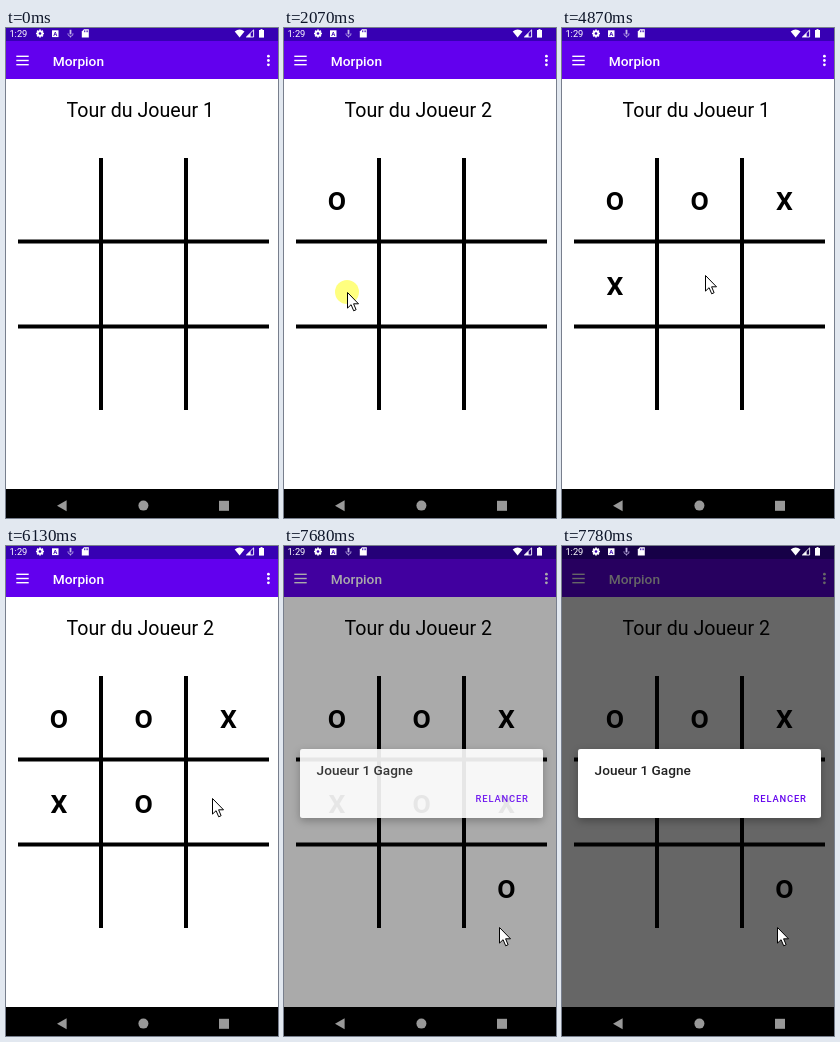
Recreate the animation shown at these times as an HTML page with a canvas. Size 272 by 490 pixels, loop 8000 ms.

```html
<!DOCTYPE html>
<html lang="fr">
<head>
<meta charset="utf-8">
<title>Morpion</title>
<style>
html, body { margin: 0; width: 100%; height: 100%; overflow: hidden; background: #fff; }
canvas { display: block; width: 272px; height: 490px; }
</style>
</head>
<body>
<canvas id="stage"></canvas>
<script>
const W = 272, H = 490, LOOP = 8000;
const canvas = document.getElementById('stage');
const ctx = canvas.getContext('2d');
const ratio = window.devicePixelRatio || 1;
canvas.width = W * ratio;
canvas.height = H * ratio;

const COLS = [53, 137.7, 222.5];
const ROWS = [181.6, 266.6, 351.6];

// Each turn: press, release and mark times, cell, pointer position
const turns = [
  { press: 1110, release: 1360, mark: 1410, col: 0, row: 0, at: [46, 166] },
  { press: 2070, release: 2270, mark: 2320, col: 0, row: 1, at: [63, 264] },
  { press: 2980, release: 3250, mark: 3250, col: 1, row: 0, at: [157, 162] },
  { press: 4160, release: 4360, mark: 4410, col: 2, row: 0, at: [215, 179] },
  { press: 5170, release: 5370, mark: 5420, col: 1, row: 1, at: [143, 247] },
  { press: 6350, release: 6550, mark: 6600, col: 2, row: 1, at: [206, 252] },
  { press: 7260, release: 7460, mark: 7510, col: 2, row: 2, at: [215, 381] }
];

// Pointer travel: start, end, number of steps, waypoints
const moves = [
  { from: 290, to: 860, steps: 12, path: [[214, 434], [190, 350], [120, 235], [60, 147], [46, 166]] },
  { from: 1570, to: 1770, steps: 5, path: [[46, 166], [52, 205], [61, 252], [63, 264]] },
  { from: 2530, to: 2780, steps: 6, path: [[63, 264], [90, 236], [140, 175], [156, 160], [157, 162]] },
  { from: 3500, to: 3850, steps: 8, path: [[157, 162], [160, 206], [178, 240], [200, 207], [215, 179]] },
  { from: 4720, to: 4870, steps: 4, path: [[215, 179], [190, 210], [152, 243], [143, 247]] },
  { from: 5680, to: 6130, steps: 9, path: [[143, 247], [158, 248], [183, 250], [202, 251], [206, 252]] },
  { from: 6810, to: 6960, steps: 4, path: [[206, 252], [209, 300], [214, 362], [215, 381]] }
];

// Dialog fade: time, screen dimming, dialog opacity
const fades = [[7630, 0.066, 0.27], [7680, 0.333, 0.9], [7730, 0.49, 1], [7780, 0.6, 1]];

function rect(x, y, w, h, color) {
  ctx.fillStyle = color;
  ctx.fillRect(x, y, w, h);
}

function disc(x, y, r, color) {
  ctx.fillStyle = color;
  ctx.beginPath();
  ctx.arc(x, y, r, 0, Math.PI * 2);
  ctx.fill();
}

function shape(points, fill, stroke, width = 1) {
  ctx.beginPath();
  points.forEach(([x, y]) => ctx.lineTo(x, y));
  ctx.closePath();
  if (fill) { ctx.fillStyle = fill; ctx.fill(); }
  if (stroke) { ctx.strokeStyle = stroke; ctx.lineWidth = width; ctx.stroke(); }
}

function text(str, x, y, size, { weight = 400, color = '#000', align = 'left', spacing = 0 } = {}) {
  ctx.font = `${weight} ${size}px Roboto, sans-serif`;
  ctx.letterSpacing = spacing + 'px';
  ctx.textAlign = align;
  ctx.fillStyle = color;
  ctx.fillText(str, x, y);
}

// Catmull-Rom through evenly timed waypoints
function along(path, u) {
  const last = path.length - 1;
  const i = Math.min(Math.floor(u * last), last - 1);
  const f = u * last - i;
  const pt = k => path[Math.max(0, Math.min(last, k))];
  return [0, 1].map(d => {
    const a = pt(i - 1)[d], b = pt(i)[d], c = pt(i + 1)[d], e = pt(i + 2)[d];
    return b + 0.5 * f * (c - a + f * (2 * a - 5 * b + 4 * c - e + f * (3 * (b - c) + e - a)));
  });
}

function pointerAt(t) {
  const move = moves.filter(m => t >= m.from).pop();
  if (!move) return null;
  const gap = (move.to - move.from) / (move.steps - 1);
  const step = Math.min(move.steps, Math.floor((t - move.from) / gap + 1e-6) + 1);
  return along(move.path, step / move.steps).map(Math.round);
}

function drawAppBar() {
  rect(0, 0, W, 13, '#3700b3');
  rect(0, 13, W, 38, '#6200ee');
  for (let i = 0; i < 3; i++) {
    rect(10.3, 27.6 + i * 4.2, 12.4, 1.4, '#fff');
    disc(262.4, 28.2 + i * 4.3, 1.4, '#fff');
  }
  text('Morpion', 46.8, 37.7, 13.7, { weight: 500, color: '#fff' });
}

function drawBoard(t) {
  const played = turns.filter(turn => t >= turn.mark);
  text('Tour du Joueur ' + (played.length % 2 + 1), 60.6, 89, 19.6);
  for (const c of [95, 180]) {
    rect(c - 2, 130, 4, 252, '#000');
    rect(12, c + 116.5, 251, 4, '#000');
  }
  played.forEach(({ col, row }, i) => {
    const sign = turns.indexOf(played[i]) % 2 ? 'X' : 'O';
    text(sign, COLS[col], ROWS[row], 26.5, { weight: 700, align: 'center' });
  });
}

function drawStatusIcons() {
  const white = '#fff', dark = '#3700b3';
  text('1:29', 3.4, 9.2, 9.3, { color: white });

  // gear
  ctx.strokeStyle = white;
  ctx.lineWidth = 1.7;
  for (let i = 0; i < 4; i++) {
    const a = i * Math.PI / 4, x = 4 * Math.cos(a), y = 4 * Math.sin(a);
    ctx.beginPath();
    ctx.moveTo(34 - x, 5.5 - y);
    ctx.lineTo(34 + x, 5.5 + y);
    ctx.stroke();
  }
  disc(34, 5.5, 3.1, white);
  disc(34, 5.5, 1.3, dark);

  // letter tile
  rect(46, 2.3, 6.5, 6.8, white);
  text('A', 49.25, 8, 6, { weight: 700, color: dark, align: 'center' });

  // small bug
  ctx.lineWidth = 0.8;
  ctx.strokeStyle = '#c9bcec';
  ctx.beginPath();
  ctx.arc(64.5, 5.8, 2.5, -0.2, Math.PI + 0.2);
  ctx.moveTo(64.5, 8);
  ctx.lineTo(64.5, 9.5);
  ctx.stroke();
  rect(63.6, 1.8, 1.8, 4.6, '#c9bcec');

  // memory card
  shape([[78, 1.3], [82.8, 1.3], [82.8, 9.5], [75.8, 9.5], [75.8, 3.6]], white);
  for (const x of [78, 79.7, 81.3]) rect(x, 2.4, 0.8, 1.8, dark);

  // wifi, signal, battery
  ctx.fillStyle = white;
  ctx.beginPath();
  ctx.moveTo(233.6, 9.5);
  ctx.lineTo(228.7, 3.4);
  ctx.quadraticCurveTo(233.6, -0.2, 238.5, 3.4);
  ctx.fill();
  shape([[247.6, 1.9], [247.6, 9], [240.4, 9]], null, white, 0.9);
  shape([[244.6, 5], [244.6, 9], [240.4, 9]], white);
  rect(253, 2, 5, 7.6, white);
  rect(254.5, 1.1, 2, 1, white);
}

function drawNavBar() {
  const gray = '#999';
  rect(0, 461, W, 29, '#000');
  shape([[51, 477.7], [60.6, 472.2], [60.6, 483.2]], gray);
  disc(137.4, 477.6, 5, gray);
  rect(213, 472.8, 10, 10, gray);
}

function drawDialog(alpha) {
  const box = new Path2D();
  box.roundRect(16, 203, 243, 69, 2.7);
  const outside = new Path2D();
  outside.rect(0, 0, W, 461);
  outside.addPath(box);

  ctx.save();
  ctx.globalAlpha = alpha;
  ctx.fillStyle = '#fff';
  ctx.save();
  ctx.clip(outside, 'evenodd');
  ctx.shadowColor = 'rgba(0,0,0,.3)';
  ctx.shadowBlur = 9 * ratio;
  ctx.shadowOffsetY = 3 * ratio;
  ctx.fill(box);
  ctx.restore();
  ctx.fill(box);
  text('Joueur 1 Gagne', 32.6, 229.3, 13.6, { weight: 500, color: '#212121' });
  text('RELANCER', 191.6, 256.2, 9.4, { weight: 500, color: '#6200ee', spacing: 0.84 });
  ctx.restore();
}

function drawPointer(t) {
  const pos = pointerAt(t);
  if (!pos) return;
  const pressed = turns.find(turn => t >= turn.press && t < turn.release);
  if (pressed) disc(...pressed.at, 12, 'rgba(255,255,0,.5)');
  ctx.save();
  ctx.translate(pos[0] + 0.5, pos[1] + 0.5);
  shape([[0, 0], [0, 15.6], [3.6, 12.2], [6.2, 18.3], [8.6, 17.2], [6.1, 11.3], [11, 11.3]], '#fff', '#000');
  ctx.restore();
}

function draw(t) {
  ctx.setTransform(ratio, 0, 0, ratio, 0, 0);
  rect(0, 0, W, H, '#fff');
  drawAppBar();
  drawBoard(t);
  const fade = fades.filter(f => t >= f[0]).pop();
  if (fade) {
    rect(0, 0, W, 461, `rgba(0,0,0,${fade[1]})`);
    drawDialog(fade[2]);
  }
  drawStatusIcons();
  drawNavBar();
  drawPointer(t);
}

const start = performance.now();
function tick(now) {
  draw(Math.max(0, now - start) % LOOP);
  requestAnimationFrame(tick);
}
draw(0);
requestAnimationFrame(tick);
</script>
</body>
</html>
```
